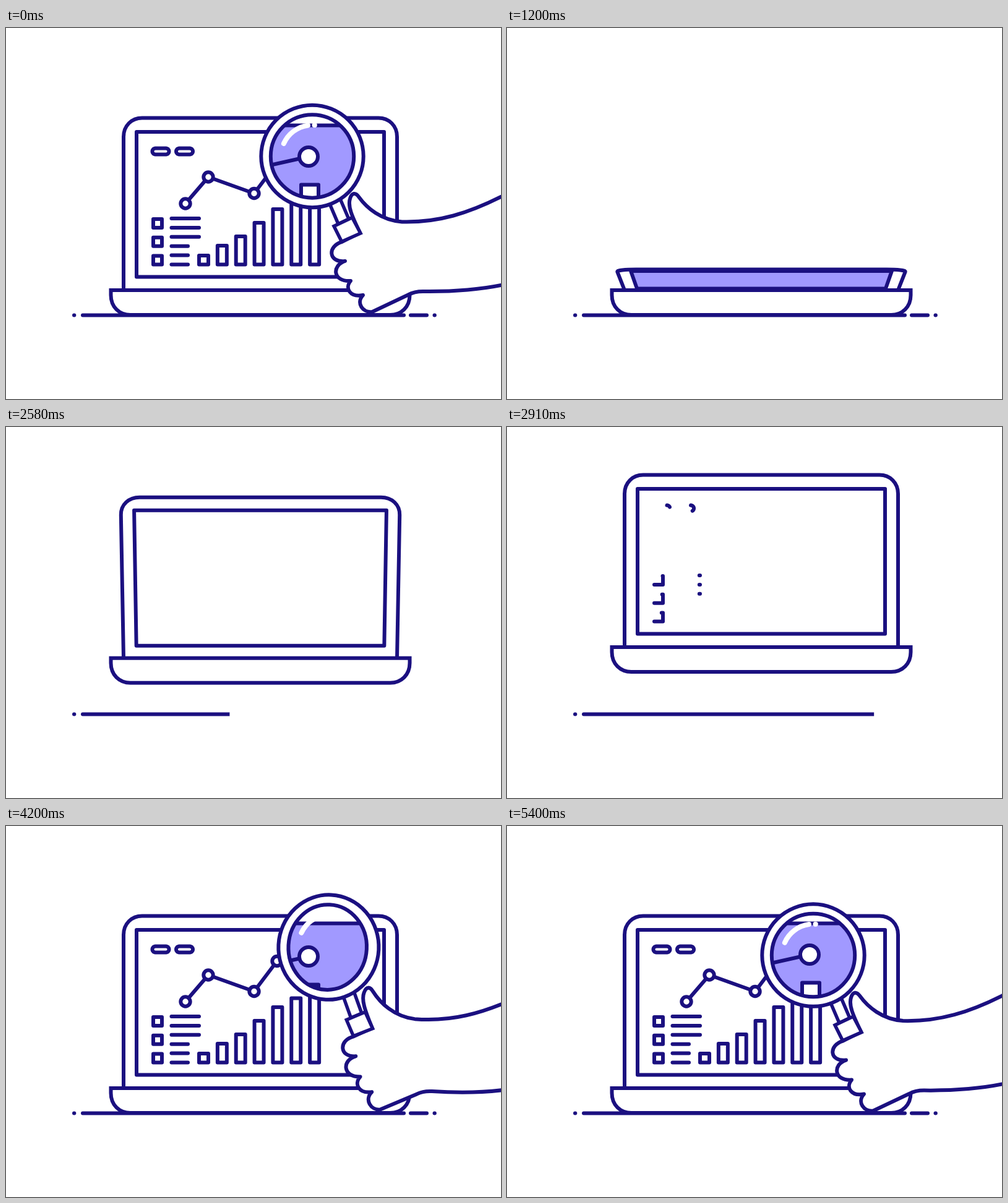
Write an HTML page with a canvas that moves like this. It is 800 by 600 pixels and loops after 5430 ms.

```html
<!DOCTYPE html>
<html lang="en">
<head>
<meta charset="utf-8">
<title>Data analysis</title>
<style>
html, body { margin: 0; width: 100%; height: 100%; overflow: hidden; background: #fff; }
canvas { display: block; width: 800px; height: 600px; }
</style>
</head>
<body>
<canvas id="stage" width="800" height="600"></canvas>
<script>
const ctx = document.getElementById('stage').getContext('2d');
const LOOP = 5430, INK = '#1b1080', LILAC = '#a199ff', RAD = Math.PI / 180;

const clamp = v => Math.max(0, Math.min(1, v));
const span = (t, a, b) => clamp((t - a) / (b - a));
const sine = u => (1 - Math.cos(Math.PI * u)) / 2;
const outCubic = u => 1 - (1 - u) ** 3;
const outBack = (u, s) => 1 + (s + 1) * (u - 1) ** 3 + s * (u - 1) ** 2;
const inBack = (u, s) => (s + 1) * u ** 3 - s * u * u;

// time, lens x, lens y, turn, upright stretch, lens width
const keys = [
  [-2010, 1000, 140, 28, 1.55, 0.1],
  [-1770, 850, 119, 22.5, 1.5, 0.15],
  [-1440, 600, 165, 8, 1.08, 0.85],
  [-1230, 521.5, 196, 3, 1.025, 0.98],
  [-870, 496, 222, 0, 1, 1],
  [-680, 495, 230, 0, 1, 1],
  [-300, 495, 223, 0, 1, 1],
  [0, 495, 207.5, 0, 1, 1],
  [570, 528, 178, 4, 1.025, 0.98],
  [810, 567, 127, 9, 1.06, 0.958],
  [990, 700, 85, 15, 1.2, 0.75],
  [1140, 960, 90, 24, 1.5, 0.2]
];

function slope(i, c) {
  if (i < 1 || i > keys.length - 2) {
    const j = i < 1 ? 0 : i - 1;
    return (keys[j + 1][c] - keys[j][c]) / (keys[j + 1][0] - keys[j][0]);
  }
  const a = (keys[i][c] - keys[i - 1][c]) / (keys[i][0] - keys[i - 1][0]);
  const b = (keys[i + 1][c] - keys[i][c]) / (keys[i + 1][0] - keys[i][0]);
  return a * b > 0 ? 2 * a * b / (a + b) : 0;
}

// Smooth curve through the keys without overshoot
function pose(t) {
  let i = 0;
  while (i < keys.length - 2 && t > keys[i + 1][0]) i++;
  const p = keys[i], q = keys[i + 1], d = q[0] - p[0], u = clamp((t - p[0]) / d);
  return [1, 2, 3, 4, 5].map(c =>
    p[c] * (1 + 2 * u) * (1 - u) ** 2 + q[c] * u * u * (3 - 2 * u) +
    d * (slope(i, c) * u * (1 - u) ** 2 - slope(i + 1, c) * u * u * (1 - u)));
}

function ink(fill, width = 6) {
  if (fill) { ctx.fillStyle = fill; ctx.fill(); }
  ctx.strokeStyle = INK;
  ctx.lineWidth = width;
  ctx.stroke();
}

function poly(points, closed) {
  ctx.beginPath();
  points.forEach(p => ctx.lineTo(p[0], p[1]));
  if (closed) ctx.closePath();
}

const dist = (a, b) => Math.hypot(b[0] - a[0], b[1] - a[1]);

// Strokes the first part of a polyline
function trim(points, part) {
  if (part <= 0) return;
  let len = 0;
  for (let i = 1; i < points.length; i++) len += dist(points[i - 1], points[i]);
  poly(points, part >= 1 && dist(points[0], points[points.length - 1]) < 0.1);
  if (part < 1) ctx.setLineDash([len * part, len * 2]);
  ink();
  ctx.setLineDash([]);
}

function ground(t) {
  const from = t < 2015 ? 107 + 590 * sine(span(t, 1675, 2005)) : 107;
  const to = t < 2015 ? 697 : 107 + 590 * sine(span(t, 2020, 3250));
  if (to <= from) return;
  ctx.save();
  ctx.beginPath();
  ctx.rect(from, 450, to - from, 30);
  ctx.clip();
  ctx.lineCap = 'round';
  for (const [a, b] of [[110, 110.3], [124, 643], [654, 680], [692.5, 692.8]]) {
    poly([[a, 464.5], [b, 464.5]]);
    ink();
  }
  ctx.restore();
}

function fold(t) {
  if (t < 2000) return Math.cos(90 * RAD * span(t, 600, 1230) ** 1.7);
  return Math.sin(90 * RAD * outCubic(span(t, 2400, 2870)));
}

function lift(t) {
  if (t < 2000) return 48 * inBack(span(t, 1230, 1690), 1.2);
  if (t < 2905) return 48 - 116 * outCubic(span(t, 2300, 2905));
  if (t < 3130) return -68 * (1 - span(t, 2905, 3130) ** 2);
  return -7 * Math.sin(Math.PI * span(t, 3130, 3290));
}

function laptop(t) {
  if (t > 1695 && t < 2300) return;
  const k = fold(t), dy = lift(t);
  const widen = 0.06 * Math.sqrt(Math.max(0, 1 - k * k));
  const at = (x, y) => [
    411 + (x - 411) * (1 + widen * (424 - y) / 279),
    424 - (424 - y) * k
  ];
  ctx.save();
  ctx.beginPath();
  ctx.rect(0, 0, 800, 467.5);
  ctx.clip();
  ctx.translate(0, dy);

  ctx.lineJoin = 'round';
  ctx.beginPath();
  ctx.moveTo(...at(190, 424));
  ctx.lineTo(...at(190, 176));
  ctx.bezierCurveTo(...at(190, 158), ...at(203, 145.5), ...at(220, 145.5));
  ctx.lineTo(...at(602, 145.5));
  ctx.bezierCurveTo(...at(619, 145.5), ...at(632, 158), ...at(632, 176));
  ctx.lineTo(...at(632, 424));
  ink('#fff');

  poly([at(211, 168), at(611, 168), at(611, 402.5), at(211, 402.5)], true);
  if (t < 2000) {
    ctx.save();
    ctx.globalAlpha = span(t, 600, 1000);
    ctx.fillStyle = LILAC;
    ctx.fill();
    ctx.restore();
  }
  ink();
  if (t < 1150 || t > 2850) dashboard(t, k, (x, y) => at(x, 402 - (402 - y) * k * k));

  ctx.lineJoin = 'miter';
  ctx.beginPath();
  ctx.moveTo(169.5, 424);
  ctx.lineTo(169.5, 432);
  ctx.bezierCurveTo(169.5, 451, 183, 464, 201, 464);
  ctx.lineTo(621, 464);
  ctx.bezierCurveTo(639, 464, 652.5, 451, 652.5, 432);
  ctx.lineTo(652.5, 424);
  ctx.closePath();
  ink('#fff');
  ctx.restore();
}

function dashboard(t, k, at) {
  const intro = t > 2000;
  const part = (a, b) => intro ? span(t, a, b) : 1;
  const map = pts => pts.map(p => at(p[0], p[1]));
  const fillWhite = pts => { poly(pts, true); ctx.fillStyle = '#fff'; ctx.fill(); };
  ctx.save();
  ctx.lineCap = ctx.lineJoin = 'round';
  if (!intro) ctx.globalAlpha = 1 - span(t, 760, 1150);

  [236.5, 275].forEach((x, i) => {
    const pts = [];
    for (let a = -90; a <= 270; a += 15) {
      const cx = a <= 90 ? x + 22 : x + 5;
      pts.push([cx + 5 * Math.cos(a * RAD), 199.5 + 5 * Math.sin(a * RAD)]);
      if (a === 90) pts.push([x + 5, 204.5]);
    }
    pts.push(pts[0]);
    const m = map(pts);
    if (part(2900, 3080) === 1) fillWhite(m);
    trim(m, part(2895 - 25 * i, 3080));
  });

  for (let i = 0; i < 3; i++) {
    const y = 323 + 29.7 * i;
    const box = map([[238, y], [252, y], [252, y - 14], [238, y - 14], [238, y]]);
    if (part(2850, 2980) === 1) fillWhite(box);
    trim(box, part(2850 - 4 * i, 2970));
  }
  for (let i = 0; i < 6; i++) {
    const y = 308 + 14.9 * i, x = i < 3 ? 312 : 294;
    const start = i < 3 ? 2905 : 2960;
    trim(map([[x, y], [267.5, y]]), part(start, start + 230));
  }

  [368, 352, 337, 315, 293, 278.5, 229].forEach((top, i) => {
    const start = 3150 + 67 * i, x = 319.5 + 29.85 * i;
    const u = part(start, start + 500);
    if (u <= 0) return;
    const y = 382.5 - (382.5 - top) * Math.max(0, outBack(u, 2.7));
    poly(map([[x - 7.5, 382.5], [x + 7.5, 382.5], [x + 7.5, y], [x - 7.5, y]]), true);
    ink('#fff');
  });

  const dots = [[290, 284], [327, 241], [401, 267.5], [438, 218.5], [498, 204]];
  trim(map(dots), Math.sin(part(3150, 3795) * Math.PI / 2));
  dots.forEach((p, i) => {
    const start = [3420, 3480, 3622, 3640, 3654][i];
    const u = part(start, start + 210);
    if (u <= 0) return;
    const r = 7.7 * Math.max(0.05, outBack(u, 1.5)), c = at(p[0], p[1]);
    ctx.beginPath();
    ctx.ellipse(c[0], c[1], r, r * k, 0, 0, 7);
    ink('#fff', Math.min(6, r * 2));
  });
  ctx.restore();
}

// Path built in the turned and stretched space, stroked at even width
function shape(p, wide, build, shift = 0) {
  ctx.save();
  ctx.translate(p[0], p[1]);
  ctx.rotate(p[2] * RAD);
  ctx.translate(shift, 0);
  ctx.scale(wide, p[3]);
  ctx.translate(-495, -207.5);
  ctx.beginPath();
  build();
  ctx.restore();
}

function handPath() {
  ctx.moveTo(1050, 130);
  ctx.bezierCurveTo(960, 190, 870, 240, 800, 273);
  ctx.bezierCurveTo(748, 299, 700, 315, 640, 313.5);
  ctx.bezierCurveTo(606, 311, 583, 291, 570, 273);
  ctx.bezierCurveTo(565, 266, 559, 266, 556, 276);
  ctx.bezierCurveTo(552, 288, 559, 304, 572, 331);
  ctx.lineTo(543, 346);
  ctx.bezierCurveTo(519, 353, 521, 380, 548, 377);
  ctx.bezierCurveTo(526, 384, 528, 411, 557, 409);
  ctx.bezierCurveTo(547, 421, 556, 436, 577, 432);
  ctx.bezierCurveTo(565, 445, 577, 461, 592, 459);
  ctx.lineTo(650, 431.5);
  ctx.bezierCurveTo(658, 427, 664, 426, 674, 426);
  ctx.bezierCurveTo(715, 426.5, 755, 425, 800, 416);
  ctx.bezierCurveTo(880, 400, 960, 380, 1050, 350);
  ctx.closePath();
}

function lensView(p, wide, shift) {
  const drift = Math.min(3, (1 - p[4]) * 150);
  ctx.fillStyle = LILAC;
  ctx.fillRect(0, 0, 1100, 600);
  ctx.fillStyle = '#fff';
  ctx.fillRect(0, 118, 1100, 40);
  for (const y of [118, 157.5]) {
    poly([[0, y], [1100, y]]);
    ink();
  }
  ctx.lineJoin = 'round';
  poly([[380, 232.5 + drift], [489, 208 + drift]]);
  ink();
  ctx.beginPath();
  ctx.arc(489, 208 + drift, 15, 0, 7);
  ink('#fff');
  ctx.beginPath();
  ctx.rect(477, 253.5 + drift, 28, 120);
  ink('#fff');

  ctx.lineCap = 'round';
  ctx.strokeStyle = '#fff';
  ctx.lineWidth = 8;
  for (const [a, b] of [[204, 262], [274, 274.3]]) {
    shape(p, wide, () => ctx.arc(495, 207.5, 50.5, a * RAD, b * RAD), shift);
    ctx.stroke();
  }
}

function loupe(t) {
  const time = t > 2200 ? t - LOOP : t;
  if (time < -2010 || time > 1140) return;
  const p = pose(time), q = p[4], inner = q ** 3;
  const shift = -Math.min(5, (1 - q) * 85);
  ctx.save();
  ctx.lineCap = ctx.lineJoin = 'round';
  shape(p, 1, handPath);
  ink('#fff');
  ctx.lineJoin = 'miter';
  const quad = pts => () => {
    pts.forEach(c => ctx.lineTo(c[0], c[1]));
    ctx.closePath();
  };
  shape(p, 1, quad([[522, 282], [539, 274], [554, 309], [537, 317]]));
  ink('#fff', 5.5);
  shape(p, 1, quad([[530, 320.5], [559.5, 306.5], [573, 332], [542.5, 345.5]]));
  ink('#fff', 5.5);

  shape(p, q, () => ctx.arc(495, 207.5, 82.7, 0, 7));
  ink('#fff');
  const rim = () => ctx.arc(495, 207.5, 67.2, 0, 7);
  ctx.save();
  shape(p, inner, rim, shift);
  ctx.clip();
  lensView(p, inner, shift);
  ctx.restore();
  shape(p, inner, rim, shift);
  ink();
  ctx.restore();
}

function draw(t) {
  ctx.fillStyle = '#fff';
  ctx.fillRect(0, 0, 800, 600);
  ground(t);
  laptop(t);
  loupe(t);
}

const begin = performance.now();
function tick() {
  draw((performance.now() - begin) % LOOP);
  requestAnimationFrame(tick);
}
tick();
</script>
</body>
</html>
```
